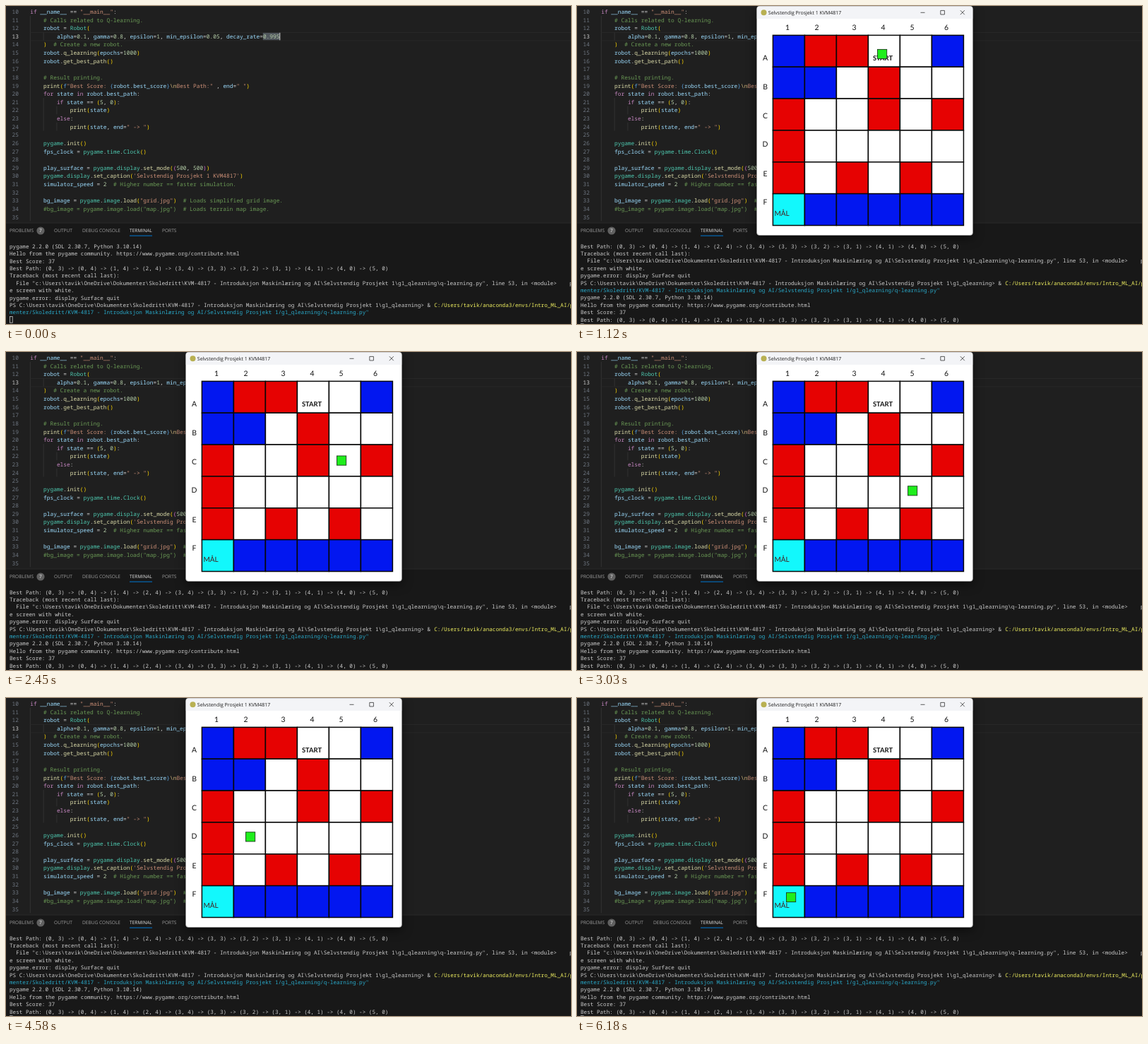
An HTML page for the animation above (6210 ms loop, 800 by 450 pixels).

```html
<!DOCTYPE html>
<html lang="en">
<head>
<meta charset="utf-8">
<title>Grid robot</title>
<style>
  html, body { margin: 0; width: 100%; height: 100%; overflow: hidden; background: #1f1f1f; }
  svg { display: block; overflow: hidden; }
  text { white-space: pre; text-rendering: geometricPrecision; }
  .code { font: 7.85px "Noto Sans Mono", "DejaVu Sans Mono", monospace; }
  .term { font: 7.65px "Noto Sans Mono", "DejaVu Sans Mono", monospace; }
  .ui { font-family: "Open Sans", "Noto Sans", sans-serif; }
  .label { font-family: Lato, "Open Sans", sans-serif; }
  #win { filter: drop-shadow(0 4px 7px rgba(0, 0, 0, .5)); }
</style>
</head>
<body>
<svg id="stage" width="800" height="450" viewBox="0 0 800 450">
  <rect width="800" height="450" fill="#1f1f1f"/>
  <g id="editor" class="code"></g>
  <rect y="307" width="800" height="143" fill="#181818"/>
  <rect y="306.5" width="800" height="1" fill="#2b2b2b"/>
  <g id="tabs" class="ui" font-size="6.6"></g>
  <svg y="333" width="800" height="117"><g id="term" class="term"></g></svg>
  <g id="win"></g>
</svg>
<script>
const LOOP = 6210;
const TASK = 'Selvstendig Prosjekt 1';
const USER = 'tavik';
const $ = id => document.getElementById(id);

function add(parent, tag, attrs, content) {
  const el = document.createElementNS('http://www.w3.org/2000/svg', tag);
  for (const key in attrs) el.setAttribute(key, attrs[key]);
  if (content !== undefined) el.textContent = content;
  parent.appendChild(el);
  return el;
}
const box = (parent, x, y, width, height, fill, more) =>
  add(parent, 'rect', { x, y, width, height, fill, ...more });
const write = (parent, x, y, fill, content, more) =>
  add(parent, 'text', { x, y, fill, ...more }, content);

// Editor
const FIRST = 10, CODE_X = 34.2, CODE_W = 4.71, CODE_H = 11.62;
const source = `if __name__ == "__main__":
    # Calls related to Q-learning.
    robot = Robot(
        alpha=0.1, gamma=0.8, epsilon=1, min_epsilon=0.05, decay_rate=0.995
    )  # Create a new robot.
    robot.q_learning(epochs=1000)
    robot.get_best_path()

    # Result printing.
    print(f"Best Score: {robot.best_score}\\nBest Path:" , end=" ")
    for state in robot.best_path:
        if state == (5, 0):
            print(state)
        else:
            print(state, end=" -> ")

    pygame.init()
    fps_clock = pygame.time.Clock()

    play_surface = pygame.display.set_mode((500, 500))
    pygame.display.set_caption('${TASK} KVM4817')
    simulator_speed = 2  # Higher number == faster simulation.

    bg_image = pygame.image.load("grid.jpg")  # Loads simplified grid image.
    #bg_image = pygame.image.load("map.jpg")  # Loads terrain map image.
`.split('\n');

const rules = [
  ['#6a9955', /^#.*/],
  ['string', /^f?("[^"]*"|'[^']*')/],
  ['#c586c0', /^(if|for|in|else)\b/],
  ['#b5cea8', /^\d+(\.\d+)?/],
  ['#4ec9b0', /^(Robot|Clock|pygame|time|display|image)\b/],
  ['#dcdcaa', /^\w+(?=\()/],
  ['#9cdcfe', /^\w+/],
  ['bracket', /^[()]/],
  ['#d4d4d4', /^[^\w\s()]/]
];
const stringParts = /^f(?=")|\{|\}|\\n|robot\.best_score|[^{}\\]/g;

function stringColor(part) {
  if (part === 'f' || part === '{' || part === '}') return '#569cd6';
  if (part === '\\n') return '#d7ba7d';
  return part.startsWith('robot.') ? '#9cdcfe' : '#ce9178';
}

function drawEditor(g) {
  const lineTop = n => 2.2 + (n - FIRST) * CODE_H;
  const guide = (col, from, to) => box(g, CODE_X + col * CODE_W - .3, lineTop(from),
    .7, lineTop(to + 1) - lineTop(from), '#3a3a3a');
  guide(0, 11, 35);
  guide(4, 13, 13);
  guide(4, 21, 24);
  guide(8, 22, 22);
  guide(8, 24, 24);
  for (const n of [13, 14]) box(g, CODE_X, lineTop(n), 766, .7, '#2b2b2b');
  box(g, 363.8, 38, 24, 10.2, '#50565c');
  box(g, 387.3, 37.8, 1, 10.6, '#cccccc');

  let depth = 0;
  source.forEach((line, i) => {
    const n = FIRST + i, y = 11 + i * CODE_H;
    const put = (col, fill, part) => write(g, CODE_X + col * CODE_W, y, fill, part);
    write(g, 18, y, n === 13 ? '#cccccc' : '#6e7681', n, { 'text-anchor': 'end' });
    let col = 0;
    while (col < line.length) {
      const rest = line.slice(col);
      const rule = rules.find(r => r[1].test(rest));
      if (!rule) { col++; continue; }
      const token = rest.match(rule[1])[0];
      if (rule[0] === 'string' && token[0] === 'f') {
        for (const m of token.matchAll(stringParts)) put(col + m.index, stringColor(m[0]), m[0]);
      } else if (rule[0] === 'string') {
        put(col, '#ce9178', token);
      } else if (rule[0] === 'bracket') {
        if (token === ')') depth--;
        put(col, depth ? '#da70d6' : '#ffd700', token);
        if (token === '(') depth++;
      } else {
        put(col, rule[0], token);
      }
      col += token.length;
    }
  });
}

function drawTabs(g) {
  const tabs = [[5, 'PROBLEMS'], [68, 'OUTPUT'], [108, 'DEBUG CONSOLE'], [175, 'TERMINAL'], [221, 'PORTS']];
  for (const [x, name] of tabs)
    write(g, x, 320.4, name === 'TERMINAL' ? '#e7e7e7' : '#9d9d9d', name);
  add(g, 'circle', { cx: 49, cy: 318, r: 5.6, fill: '#616161' });
  write(g, 49, 320.4, '#f8f8f8', '7', { 'text-anchor': 'middle' });
  box(g, 175, 324.6, 32, 1, '#0078d4');
}

// Terminal
const ROW = 10.4, TERM_W = 4.59;
const path = [[0, 3], [0, 4], [1, 4], [2, 4], [3, 4], [3, 3], [3, 2], [3, 1], [4, 1], [4, 0], [5, 0]];
const course = 'KVM-4817 - Introduksjon Maskinlæring og AI';
const folder = `\\Users\\${USER}\\OneDrive\\Dokumenter\\Skoledritt\\${course}\\${TASK}\\g1_qlearning`;
const output = [
  'pygame 2.2.0 (SDL 2.30.7, Python 3.10.14)',
  'Hello from the pygame community. https://www.pygame.org/contribute.html',
  'Best Score: 37',
  'Best Path: ' + path.map(p => `(${p.join(', ')})`).join(' -> ')
];
const prompt = `PS C:${folder}> & `;
const rows = [
  ...output,
  'Traceback (most recent call last):',
  `  File "c:${folder}\\q-learning.py", line 53, in <module>    play_surface`,
  'e screen with white.',
  'pygame.error: display Surface quit',
  prompt,
  `menter/Skoledritt/${course}/${TASK}/g1_qlearning/q-learning.py"`,
  ...output
];

function drawTerminal(g) {
  const lines = rows.map((row, i) => {
    const y = 9.7 + i * ROW;
    const line = add(g, 'g', {});
    write(line, 5, y, i === 9 ? '#29a9c9' : '#cccccc', row);
    if (row === prompt)
      write(line, 5 + prompt.length * TERM_W, y, '#f0f060', `C:/Users/${USER}/anaconda3/envs/Intro_ML_AI/python.exe`);
    return line;
  });
  const cursor = add(g, 'rect', { x: 5.5, width: 3.7, height: 8.8, fill: 'none', stroke: '#cccccc', 'stroke-width': .8 });
  return (printed, scroll) => {
    g.setAttribute('transform', `translate(0 ${-scroll * ROW})`);
    lines.forEach((line, i) => {
      line.style.display = i >= scroll && i < printed ? '' : 'none';
    });
    cursor.setAttribute('y', 2.4 + printed * ROW);
  };
}

// Simulator window
const colors = { B: '#0217f0', R: '#e60202', W: '#ffffff', C: '#12f8fc' };
const grid = ['BRRWWB', 'BBWRWW', 'RWWRWR', 'RWWWWW', 'RWRWRW', 'CBBBBB'];

function drawWindow(g) {
  box(g, 254.5, .3, 306, 324.2, '#ffffff', { rx: 4, stroke: '#8a8a8a', 'stroke-width': .6 });
  add(g, 'path', { d: 'M254.8 18V4.5q0-4 4-4h297.4q4 0 4 4V18z', fill: '#f3f4f7' });
  add(g, 'circle', { cx: 264.5, cy: 9.3, r: 4, fill: '#b8b052' });
  write(g, 270.8, 12, '#1c1c1c', `${TASK} KVM4817`, { class: 'ui', 'font-size': 7 });
  add(g, 'path', {
    d: 'M486.5 9.3h6M514.8 6.4h5.6v5.6h-5.6zM542.8 6.2l6 6m0-6l-6 6',
    fill: 'none', stroke: '#333333', 'stroke-width': .8
  });

  const X = 277.4, Y = 41.4, W = 45, H = 44.85;
  grid.forEach((row, r) => [...row].forEach((c, i) =>
    box(g, X + i * W, Y + r * H, W, H, colors[c], { stroke: '#080808', 'stroke-width': 1.5 })));

  const label = (x, y, content, more) =>
    write(g, x, y, '#111111', content, { class: 'label', 'font-size': 10.4, 'text-anchor': 'middle', ...more });
  [298, 339.5, 392.5, 433.5, 474.5, 523].forEach((x, i) => label(x, 33.8, i + 1));
  [73, 114, 155, 195.5, 237, 277.5].forEach((y, i) => label(266.5, y + 3.8, 'ABCDEF'[i]));
  label(433, 76.6, 'START', { 'font-size': 9.4, 'font-weight': 700 });
  label(290, 297.4, 'MÅL', { 'font-size': 10, fill: '#451c1c' });

  const robot = box(g, -6.6, -6.6, 13.2, 13.2, '#1fee1c', { stroke: '#1b3a1b', 'stroke-width': .9 });
  return ([r, c]) => robot.setAttribute('transform', `translate(${303.1 + 43 * c} ${68 + 42.8 * r})`);
}

// Motion: [start, rows printed, rows scrolled]
const prints = [[0, 10, 0], [670, 12, 1], [760, 14, 3]];
const OPEN = 800, STEP = 500;

drawEditor($('editor'));
drawTabs($('tabs'));
const showRows = drawTerminal($('term'));
const moveRobot = drawWindow($('win'));

function frame(now) {
  const t = now % LOOP;
  const [, printed, scroll] = prints.findLast(p => t >= p[0]);
  showRows(printed, scroll);
  $('win').style.display = t < OPEN ? 'none' : '';
  const step = Math.floor((t - OPEN) / STEP);
  moveRobot(path[Math.min(Math.max(step, 0), path.length - 1)]);
}

const start = performance.now();
function tick() {
  frame(performance.now() - start);
  requestAnimationFrame(tick);
}
tick();
</script>
</body>
</html>
```
